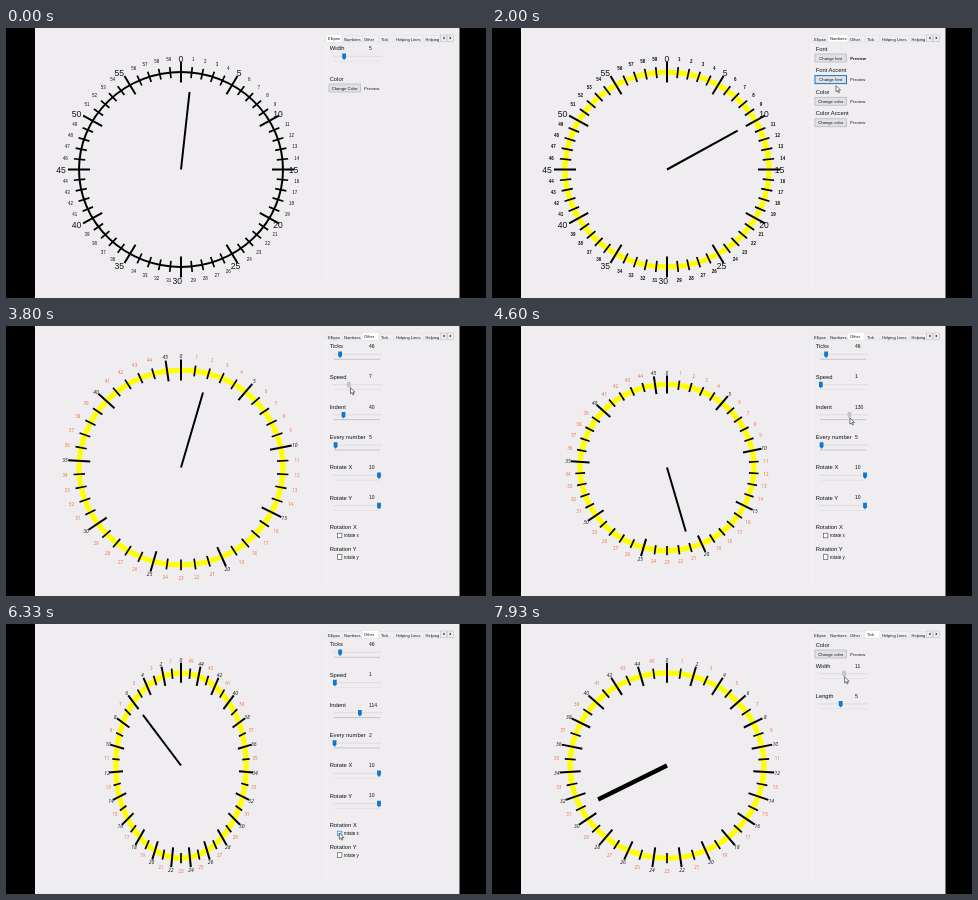
Recreate the animation shown at these times as an HTML page. Size 480 by 270 pixels, loop 8 s.

```html
<!DOCTYPE html>
<html lang="en">
<head>
<meta charset="utf-8">
<style>
html, body { margin: 0; width: 100%; height: 100%; overflow: hidden; background: #000; }
svg { display: block; width: 100vw; height: 100vh; font-family: "Liberation Sans", Arial, sans-serif; }
</style>
</head>
<body>
<svg id="stage" viewBox="0 0 480 270"></svg>
<script>
const stage = document.getElementById('stage');
const LOOP = 8000, STEP = 1000 / 15, TAU = Math.PI * 2;
const CX = 175, CY = 141.5, INK = '#111', ORANGE = '#ee6a32', BLUE = '#0f78d0';

const clamp = v => Math.min(1, Math.max(0, v));
const mix = (a, b, p) => a + (b - a) * p;
const smooth = p => p * p * (3 - 2 * p);
const mod = (n, m) => ((n % m) + m) % m;

// Value on a path of evenly timed stops.
function along(t, from, to, path) {
  const p = clamp((t - from) / (to - from)) * (path.length - 1);
  const i = Math.min(Math.floor(p), path.length - 2);
  return mix(path[i], path[i + 1], p - i);
}

// Panel layout
const pageRow = i => 20.4 + 30.25 * i;
const buttonRow = i => 30 + 21.6 * i;
const slot = (label, y, x0 = 326.5, unit = 2.33, dense = false) => ({ label, y, x0, unit, dense });
const sliders = {
  ringWidth: slot('Width', pageRow(0)),
  ticks: slot('Ticks', pageRow(0), 328.3, 0.126, true),
  speed: slot('Speed', pageRow(1)),
  indent: slot('Indent', pageRow(2), 328.6, 0.222, true),
  every: slot('Every number', pageRow(3), 327.8, 0.36, true),
  rotateX: slot('Rotate X', pageRow(4), 326.5, 4.65),
  rotateY: slot('Rotate Y', pageRow(5), 326.5, 4.65),
  tickWidth: slot('Width', 41.8),
  length: slot('Length', 72, 326.5, 4.44)
};
const thumbX = (id, v) => sliders[id].x0 + v * sliders[id].unit;
let tabEnd = 320;
const tabs = Object.entries({ Ellipse: 16, Numbers: 20, Other: 17, Tick: 15, 'Helping Lines': 29.5, Helping: 17 })
  .map(([name, w]) => ({ name, w, x: (tabEnd += w) - w }));

// What the user does, in order
const drag = (id, from, to, ...path) => ({
  id, from, to, path,
  spot: t => [thumbX(id, along(t, from, to, path)) + 0.5, sliders[id].y + 11]
});
const click = (id, from, to, x, y) => ({ id, from, to, spot: () => [x, y] });
const openTab = (i, t) => click('tab' + i, t, t + 60, tabs[i].x + 8, 11);
const press = (id, row, from, to) => click(id, from, to, 344, buttonRow(row) + 6);
const actions = [
  drag('ringWidth', 400, 900, 5, 13),
  click('ringColor', 1000, 1100, 344, 61),
  openTab(1, 1200),
  press('font', 0, 1500, 1700),
  press('accent', 1, 1900, 2260),
  press('color', 2, 2460, 2600),
  openTab(2, 2880),
  drag('ticks', 3 * LOOP / 8, 3000 + 5 * STEP, 60, 120, 180, 181, 90, 46),
  drag('speed', 3750, 3930, 10, 1),
  drag('indent', 4050, 5150, 40, 67, 130, 60, 114),
  drag('every', 5230, 5420, 5, 2, 2),
  click('rotX', 5870, 6600, 333.3, 209),
  click('rotY', 6750, 7200, 333.3, 230.5),
  openTab(3, 7300),
  drag('tickWidth', 7560, 7900, 5, 11)
];
const act = Object.fromEntries(actions.map(a => [a.id, a]));
const active = (id, t) => act[id] && t >= act[id].from && t < act[id].to + STEP;
const done = (id, t) => t >= act[id].to;
const valueOf = (id, t) => Math.round(along(t, act[id].from, act[id].to, act[id].path));

function stateAt(t) {
  const s = { rotateX: 10, rotateY: 10, length: 5 };
  for (const a of actions) if (a.path) s[a.id] = valueOf(a.id, t);
  s.tab = [1, 2, 3].filter(i => done('tab' + i, t)).length;
  s.bold = done('font', t);
  s.accentSmall = done('accent', t);
  s.orange = done('color', t);
  s.radius = along(t, act.indent.from, act.indent.to, [102, 127, 87, 131, 97]);
  // The dial repaints one step behind its slider.
  s.count = valueOf('ticks', t - STEP);
  const turn = id => active(id, t) ? Math.cos((t - act[id].from) * 0.00498) : 1;
  s.sx = turn('rotX');
  s.sy = turn('rotY');
  const slow = t0 => Math.floor((t - t0 + 2) / 222);
  s.hand = !active('ticks', t) && !done('ticks', t) ? 1 + slow(0)
    : active('ticks', t) ? 0
    : !done('speed', t) ? slow(act.ticks.to)
    : mod(Math.floor((t - 4600) * 0.0444 + 21.7), s.count);
  return s;
}

// Drawing helpers
const text = (x, y, size, str, extra = '') =>
  `<text x="${x}" y="${y}" font-size="${size}" fill="${INK}" ${extra}>${str}</text>`;
const rect = (x, y, w, h, fill, extra = '') =>
  `<rect x="${x}" y="${y}" width="${w}" height="${h}" fill="${fill}" ${extra}/>`;
const heading = (y, str) => text(323.7, y + 2, 5.8, str);

function label(s, i, big, [x, y]) {
  const large = big && !s.accentSmall;
  const size = large ? 8.6 : big ? 5 : 4.5;
  if (large) x -= 3.7 * (String(i).length - 1);
  let extra = '';
  if (big && s.accentSmall) extra = 'font-style="italic"';
  else if (!big && s.orange) extra = `style="fill:${ORANGE}"`;
  else if (!big && s.bold) extra = 'font-weight="bold"';
  if (s.orange) extra += ' font-family="Open Sans, sans-serif"';
  return text(x.toFixed(2), (y + size * 0.36).toFixed(2), size, i, extra);
}

function dial(s, t) {
  const rx = s.radius * s.sx, ry = s.radius * 0.955 * s.sy;
  const at = (i, r) => {
    const a = i / s.count * TAU;
    return [CX + Math.sin(a) * rx * r, CY - Math.cos(a) * ry * r];
  };
  const seg = (a, b) => `M${a.map(n => n.toFixed(2))}L${b.map(n => n.toFixed(2))}`;
  let major = '', minor = '', labels = '';
  for (let i = 0; i < s.count; i++) {
    const big = i % s.every === 0, half = big ? 0.108 : 0.056;
    const mark = seg(at(i, 1 - half), at(i, 1 + half));
    if (big) major += mark; else minor += mark;
    labels += label(s, i, big, at(i, 1.14));
  }
  const ring = done('ringColor', t) ? '#ff0' : '#000';
  return `<ellipse cx="${CX}" cy="${CY}" rx="${Math.abs(rx)}" ry="${Math.abs(ry)}" fill="none" stroke="${ring}" stroke-width="${s.ringWidth * 0.4}"/>` +
    `<g fill="none" stroke="#000"><path d="${minor}" stroke-width="1.7"/><path d="${major}" stroke-width="2"/>` +
    `<path d="${seg([CX, CY], at(s.hand, 0.8))}" stroke-width="${s.tickWidth * 0.4}"/></g>` +
    `<g text-anchor="middle">${labels}</g>`;
}

function slider(id, s, t) {
  const { label, y, dense } = sliders[id], ty = y + 8, x = thumbX(id, s[id]);
  return heading(y, label) + text(363, y + 1.8, 5, s[id]) +
    rect(327, ty - 0.7, 49, 1.2, '#e0dee1') +
    rect(328, ty + 4.4, 46, 0.8, dense ? '#bbb9bc' : '#e2e0e3') +
    `<path d="M${x - 1.9} ${ty - 3}h3.8v4.6l-1.9 1.9l-1.9-1.9z" fill="${active(id, t) ? '#c6c5c8' : BLUE}"/>`;
}
function button(y, label, focus = false, preview = '') {
  return rect(323, y - 4, 31.5, 8, '#e1e0e2', `stroke="${focus ? BLUE : '#adabae'}" stroke-width="${focus ? 1 : 0.6}"`) +
    text(338.7, y + 1.5, 4.2, label, 'text-anchor="middle"') +
    text(358.3, y + 1.5, 4.2, 'Preview', preview);
}
function check(y, label, on) {
  return rect(331.3, y - 2.3, 4.6, 4.6, '#fff', `stroke="${on ? BLUE : '#444'}" stroke-width=".6"`) +
    (on ? `<path d="M332.2 ${y}l1.1 1.2l1.8-2.4" fill="none" stroke="${BLUE}" stroke-width=".7"/>` : '') +
    text(337.8, y + 1.5, 4.5, label);
}

const pages = [
  (s, t) => slider('ringWidth', s, t) + heading(51, 'Color') + button(60, 'Change Color', active('ringColor', t)),
  (s, t) => [
    ['Font', 'Change font', 'font', s.bold && 'font-weight="bold"'],
    ['Font Accent', 'Change font', 'accent', s.accentSmall && 'font-style="italic"'],
    ['Color', 'Change color', 'color', s.orange && `style="fill:${ORANGE}"`],
    ['Color Accent', 'Change color']
  ].map(([title, name, id, look], i) =>
    heading(buttonRow(i) - 9.4, title) + button(buttonRow(i), name, active(id, t), look || '')).join(''),
  (s, t) => ['ticks', 'speed', 'indent', 'every', 'rotateX', 'rotateY'].map(id => slider(id, s, t)).join('') +
    heading(201, 'Rotation X') + check(209.5, 'rotate x', active('rotX', t)) +
    heading(222.8, 'Rotation Y') + check(231, 'rotate y', active('rotY', t)),
  (s, t) => heading(20.5, 'Color') + button(30, 'Change color') + slider('tickWidth', s, t) + slider('length', s, t)
];

function panel(s, t) {
  let out = rect(319.7, 14, 0.7, 242, '#faf9fb') + rect(320, 13.7, 128, 0.5, '#dcdadd');
  tabs.forEach(({ name, x, w }, i) => {
    const on = i === s.tab;
    out += rect(x, on ? 6.5 : 7.8, w, on ? 7.6 : 6, on ? '#fff' : '#f1eff2', 'stroke="#dddbde" stroke-width=".4"') +
      text(x + 2, on ? 11.9 : 12.6, 4.05, name);
  });
  for (const x of [434.5, 441.2]) out += rect(x, 7, 6.2, 6.2, '#f1f0f2', 'stroke="#b5b3b6" stroke-width=".5"');
  out += '<path d="M438.5 8.6v3l-1.7-1.5zM443.7 8.6v3l1.7-1.5z" fill="#222"/>';
  return out + pages[s.tab](s, t);
}

// The pointer rests on the current control, then glides to the next.
function cursor(t) {
  const i = actions.findLastIndex(a => t >= a.from);
  if (i < 0) return '';
  const a = actions[i], b = actions[i + 1] || a;
  const p = smooth(clamp((t - a.to) / Math.max(1, b.from - a.to)));
  const [ax, ay] = a.spot(t), [bx, by] = b.spot(t);
  return `<path transform="translate(${mix(ax, bx, p)} ${mix(ay, by, p)})" d="M0 0v6.2l1.5-1.3l1 2.3l1-.5l-1-2.2h2z" fill="#fff" stroke="#222" stroke-width=".6"/>`;
}

function draw(t) {
  const s = stateAt(t);
  stage.innerHTML = rect(0, 0, 480, 270, '#000') + rect(29, 0, 424.5, 270, '#efedf0') +
    dial(s, t) + panel(s, t) + cursor(t);
}

const start = performance.now();
let last = -1;
function frame() {
  const t = Math.max(0, performance.now() - start) % LOOP;
  const step = Math.floor((t + 10) / STEP) % 120;
  if (step !== last) draw((last = step) * STEP);
  requestAnimationFrame(frame);
}
frame();
</script>
</body>
</html>
```
